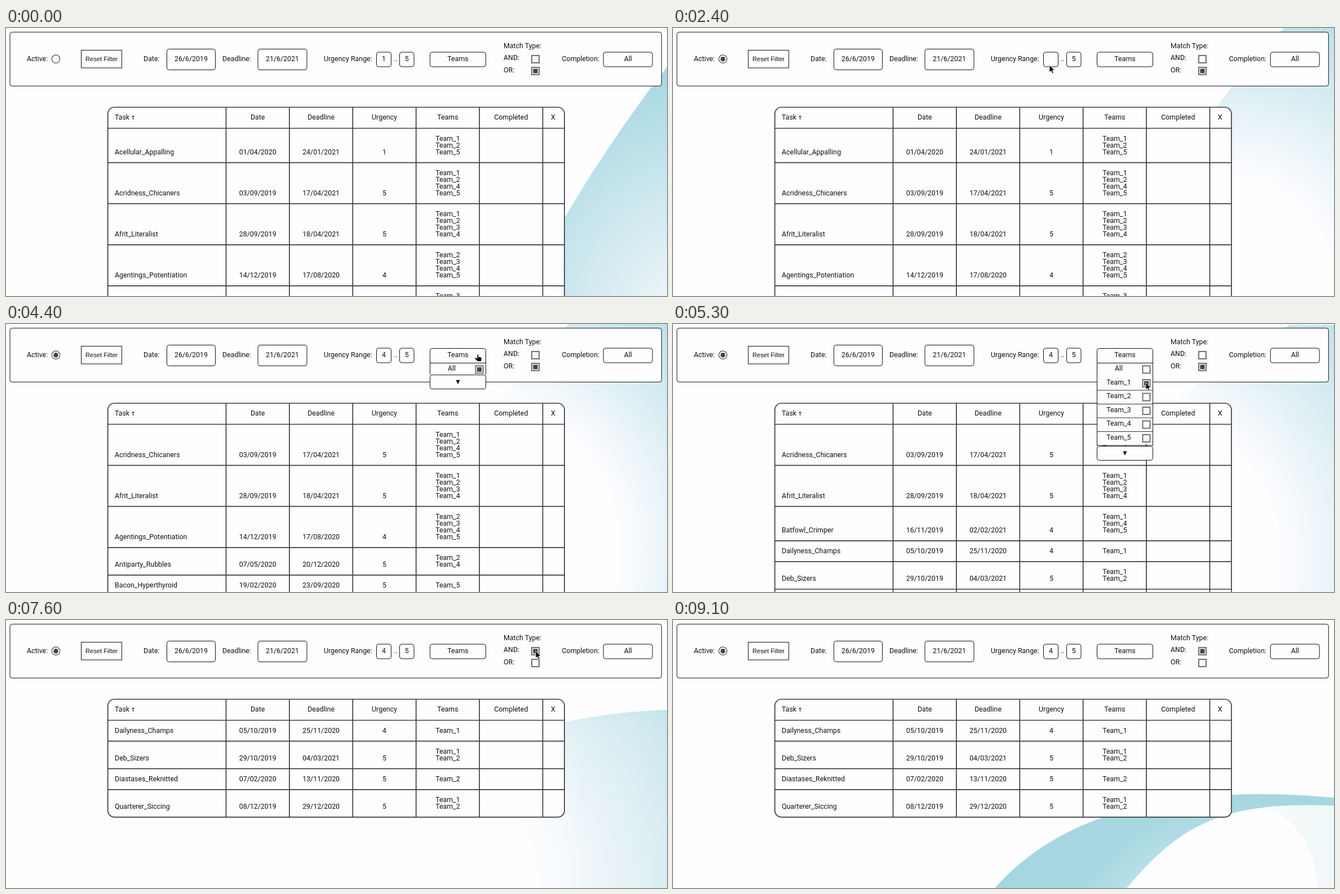
Write an HTML page that moves like this. It is 1173 px wide and 477 px high and loops after 9.2 s.

```html
<!DOCTYPE html>
<html lang="en">
<head>
<meta charset="utf-8">
<title>Task table filter</title>
<style>
  html, body { margin: 0; width: 100%; height: 100%; overflow: hidden; background: #fefdff; }
  svg { display: block; }
  text { font: 12.4px Roboto, sans-serif; fill: #111; white-space: pre; }
  .mid { text-anchor: middle; }
  .button { font: 11.2px "Liberation Sans", Arial, sans-serif; }
  .box { fill: #fefdff; stroke: #111; }
  .grid { fill: none; stroke: #3c3c42; stroke-width: 1.7; }
  .check { fill: #fefdff; stroke: #707070; stroke-width: 2; }
</style>
</head>
<body>
<svg width="1173" height="477" viewBox="0 0 1173 477">
  <defs>
    <radialGradient id="glow" gradientUnits="userSpaceOnUse">
      <stop stop-color="#a5d7e1" stop-opacity="0"/>
      <stop offset="1" stop-color="#a5d7e1"/>
    </radialGradient>
    <linearGradient id="tint">
      <stop stop-color="#f6fbfa"/>
      <stop offset="1" stop-color="#f0f8f9"/>
    </linearGradient>
  </defs>
  <path id="wave" fill="url(#glow)"/>
  <g id="hollow">
    <path fill="#fefdff" d="M790 495C892 372 960 320 1180 331V800H790Z"/>
    <path fill="url(#tint)" d="M1050 335C1105 350 1138 400 1145 480H1180V331Q1110 328 1050 335Z"/>
  </g>
  <g id="table"></g>
  <g id="filter"></g>
  <g id="menu"></g>
  <g id="cursor" stroke="#fff" stroke-width=".8"></g>
</svg>
<script>
const LOOP = 9200, STEP = 100;
const $ = id => document.getElementById(id);

// Moments at which the interface reacts
const at = { enter: 300, active: 1200, clear: 2400, typed: 2600, urgency: 3100, open: 4300, opened: 5000,
  team1: 5300, team2: 5800, close: 6400, closed: 7000, and: 7300, leave: 8000 };

// The wave leans in, folds over, then sinks
const wave = {
  start: { edge: [915, 477, 1038, 236, 1200, 35], glow: [1260, 540, 480] },
  lean: { edge: [760, 320, 852, 137, 1025, -25], glow: [820, 400, 540] },
  fold: { edge: [720, 300, 912, 85, 1180, 34], glow: [760, 440, 640] },
  sink: { edge: [545, 510, 715, 272, 1180, 317], glow: [1000, 650, 330] }
};

// Where the pointer is going, and when it gets there
const stops = [
  [at.enter, 21, 0], [at.active, 88, 53], [2000, 668, 54], [3200, 668, 134], [at.open, 836, 54],
  [at.team1, 839, 104], [at.team2, 839, 128], [at.close, 925, 121], [at.and, 940, 55]
];

// name, date, deadline, urgency, team digits
const tasks = `Acellular_Appalling 01/04/2020 24/01/2021 1 125
Acridness_Chicaners 03/09/2019 17/04/2021 5 1245
Afrit_Literalist 28/09/2019 18/04/2021 5 1234
Agentings_Potentiation 14/12/2019 17/08/2020 4 2345
Alders_Mooning 11/01/2020 05/10/2020 2 34
Antiparty_Rubbles 07/05/2020 20/12/2020 5 24
Bacon_Hyperthyroid 19/02/2020 23/09/2020 5 5
Batfowl_Crimper 16/11/2019 02/02/2021 4 145
Dailyness_Champs 05/10/2019 25/11/2020 4 1
Deb_Sizers 29/10/2019 04/03/2021 5 12
Diastases_Reknitted 07/02/2020 13/11/2020 5 2
Quarterer_Siccing 08/12/2019 29/12/2020 5 12`.split("\n").map(row => row.split(" "));

const phase = (t, from, to) => Math.min(1, Math.max(0, (t - from) / (to - from)));
const mix = (a, b, k) => a.map((v, i) => v + (b[i] - v) * k);
const easeInOut = k => k < .5 ? 4 * k ** 3 : 1 - 4 * (1 - k) ** 3;

const label = (s, x, y, cls = "") => `<text class="${cls}" x="${x}" y="${y + 4.3}">${s}</text>`;
const mid = (s, x, y) => label(s, x, y, "mid");
const box = (x, y, w, h, r = 4) =>
  `<rect class="box" x="${x}" y="${y}" width="${w}" height="${h}" rx="${r}"/>`;
const field = (s, x, w, h = 26) => box(x, 56 - h / 2, w, h) + mid(s, x + w / 2, 55);
const check = (x, y, on) => `<rect class="check" x="${x - 6.5}" y="${y - 6.5}" width="13" height="13"/>` +
  (on ? `<rect x="${x - 4}" y="${y - 4}" width="8" height="8" fill="#444"/>` : "");

function drawWave(t) {
  const { start, lean, fold, sink } = wave;
  const leaning = 1 - (1 - phase(t, 0, 4400)) ** 1.3;
  const folding = phase(t, 4400, 6400);
  const sinking = phase(t, 6400, 9100), fading = sinking ** 3;
  const pose = (part, last) =>
    mix(mix(mix(start[part], lean[part], leaning), fold[part], folding), sink[part], last);

  const [x0, y0, x1, y1, x2, y2] = pose("edge", sinking);
  $("wave").setAttribute("d", `M${x0} ${y0}Q${x1} ${y1} ${x2} ${y2}H1300V600H${x0}Z`);

  const swell = Math.sin(Math.PI * t / LOOP), glow = $("glow");
  pose("glow", fading).forEach((v, i) => glow.setAttribute(["cx", "cy", "r"][i], v));
  glow.children[0].setAttribute("offset", swell / 2);
  glow.children[1].setAttribute("stop-opacity", 1 - swell / 4);

  $("hollow").setAttribute("opacity", fading);
  $("hollow").setAttribute("transform", `translate(0 ${280 * (sinking - 1)})`);
}

function drawTable(t) {
  const chosen = t < at.team1 ? "12345" : t < at.team2 ? "1" : "12";
  const hit = team => chosen.includes(team);
  const rows = tasks.filter(([, , , urgency, teams]) => (t < at.urgency || urgency >= 4) &&
    (t < at.and ? [...teams].some(hit) : [...teams].every(hit)));
  const column = i => 390.5 + 112.4 * i;
  const centre = i => i < 5 ? column(i + .5) : 971;

  let y = 178.5, lines = "", words = label("Task", 193, 159) +
    '<path d="M225.5 163V156M223 158.5L225.5 156L228 158.5" fill="none" stroke="#111"/>';
  ["Date", "Deadline", "Urgency", "Teams", "Completed", "X"].forEach((s, i) => words += mid(s, centre(i), 159));
  for (const [name, date, deadline, urgency, teams] of rows) {
    const base = y + 6 + 12 * teams.length;
    lines += `M181 ${y}H991`;
    words += label(name, 193, base);
    [date, deadline, urgency].forEach((s, i) => words += mid(s, centre(i), base));
    [...teams].forEach((n, i) => words += mid("Team_" + n, centre(3), y + 18 + 12 * i));
    y += 25.1 + 12 * teams.length;
  }
  for (let i = 0; i < 6; i++) lines += `M${column(i)} 141V${y}`;
  $("table").innerHTML = `<rect class="grid" style="fill:#fefdff" x="180.7" y="141" width="810.3" height="${y - 141}" rx="12"/>` +
    `<path class="grid" d="${lines}"/>` + words;
}

function drawFilter(t) {
  const low = t < at.clear ? "1" : t < at.typed ? "" : "4";
  $("filter").innerHTML = box(7, 7.3, 1156.3, 96) +
    label("Active:", 37, 55) +
    '<circle cx="88.5" cy="55.2" r="7.2" fill="#fefdff" stroke="#666" stroke-width="1.5"/>' +
    (t >= at.active ? '<circle cx="88.5" cy="55.2" r="4.2" fill="#444"/>' : "") +
    box(133.5, 39.5, 72, 31.5, 0) + label("Reset Filter", 169.5, 54.5, "mid button") +
    label("Date:", 244, 55) + field("26/6/2019", 285.5, 86, 37) +
    label("Deadline:", 384, 55) + field("21/6/2021", 447, 87, 37) +
    label("Urgency Range:", 564, 55) + field(low, 657.5, 26) + mid("..", 691, 55) + field("5", 698.5, 25.5) +
    label("Match Type:", 883, 31.5) +
    label("AND:", 883, 53) + check(939.5, 55.5, t >= at.and) +
    label("OR:", 883, 74.5) + check(939.5, 76.5, t < at.and) +
    label("Completion:", 986.5, 55) + field("All", 1060.2, 87);
}

function drawMenu(t) {
  const height = 148 * (phase(t, at.open, at.opened) - phase(t, at.close, at.closed));
  const bottom = 69 + height;
  if (!height) return $("menu").innerHTML = field("Teams", 752.5, 99);
  const on = [t < at.team1, t >= at.team1, t >= at.team2];
  let items = "";
  ["All", "Team_1", "Team_2", "Team_3", "Team_4", "Team_5"].forEach((s, i) => {
    const y = 79 + 24.5 * i;
    items += mid(s, 791, y) + check(840, y + 2, on[i]);
    if (i) items += `<path d="M752 ${y + 14.5}H852" stroke="#333"/>`;
  });
  $("menu").innerHTML = `<clipPath id="list"><path d="M740 69H860V${bottom}H740Z"/></clipPath>
    <path d="M753 45H851V${Math.min(bottom, 214)}H753Z" fill="#fefdff"/>
    <g clip-path="url(#list)">${items}</g>
    <path d="M752.5 ${bottom}V47.5Q752.5 43.5 756.5 43.5H847.5Q851.5 43.5 851.5 47.5V${bottom}M752 69.5H852" fill="none" stroke="#111"/>` +
    mid("Teams", 802, 55) + box(752.5, bottom + .5, 99, 25) +
    `<path d="M798.5 ${bottom + 9.5}h7l-3.5 7.5z" fill="#111"/>`;
}

function drawCursor(t) {
  const next = Math.max(1, stops.findIndex(stop => stop[0] > t));
  const to = t < at.and ? stops[next] : stops.at(-1), from = t < at.and ? stops[next - 1] : to;
  const [, x, y] = mix(from, to, t < at.and ? easeInOut(phase(t, from[0], to[0])) : 1);
  const shape = t >= at.open && t < 4700
    ? "M0 1Q1.5-1 2.5 1V4L7 5Q8.5 5.5 8 7.5L7.5 12.5H1L-4.5 7Q-4.5 5 -2 6L0 7Z"
    : "M0 0V13L3 10.3L5 15L7.2 14L5.2 9.5H9Z";
  $("cursor").innerHTML = t < at.enter || t >= at.leave ? ""
    : `<path transform="translate(${x} ${y})" d="${shape}"/>`;
}

function frame() {
  const t = Math.floor(performance.now() % LOOP / STEP) * STEP;
  [drawWave, drawTable, drawFilter, drawMenu, drawCursor].forEach(draw => draw(t));
  requestAnimationFrame(frame);
}
frame();
</script>
</body>
</html>
```
